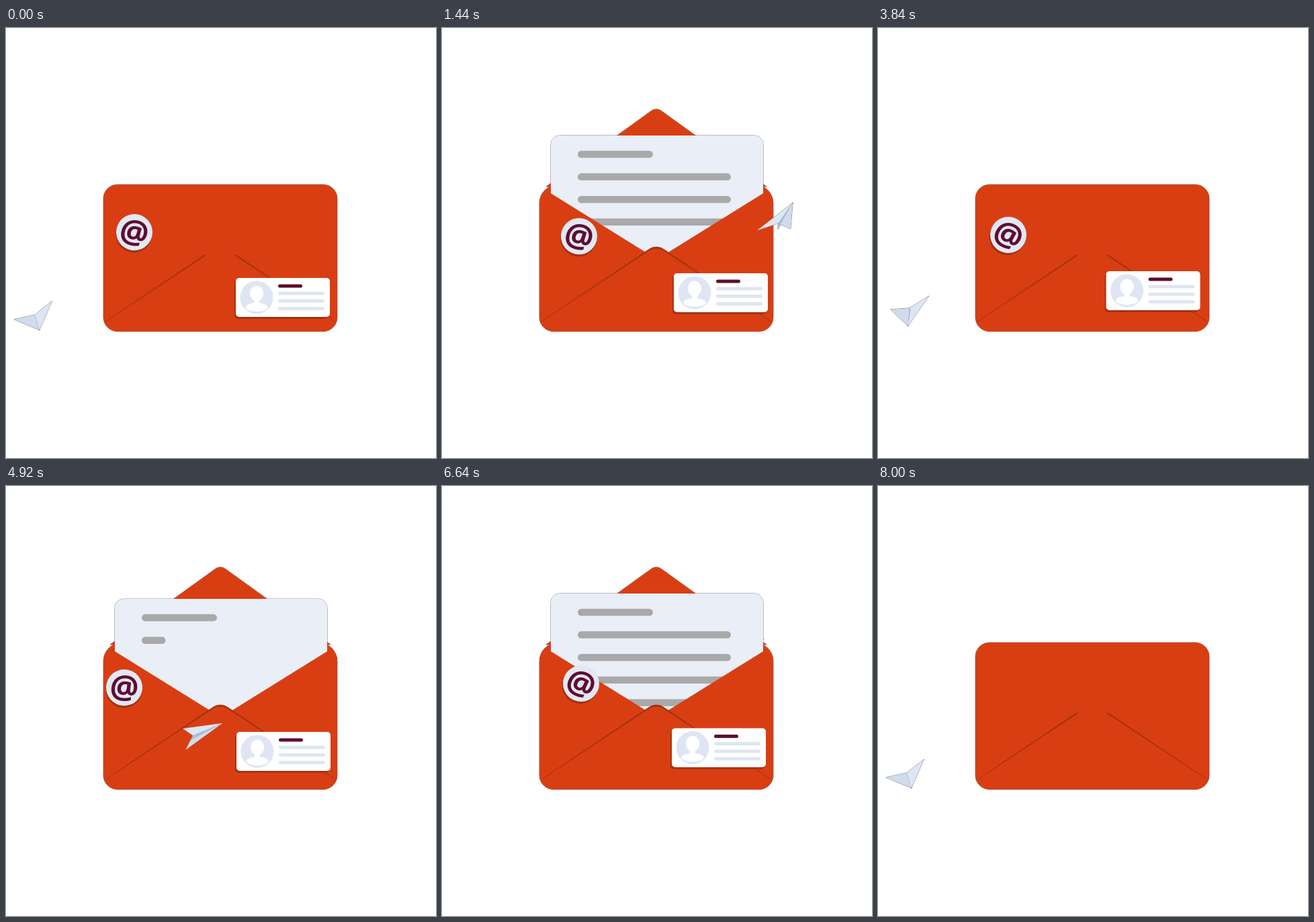
Animation of 640 by 640 pixels, one loop 8.04 s. Source, as an HTML page with a canvas:

```html
<!DOCTYPE html>
<html lang="en">
<head>
<meta charset="utf-8">
<title>Newsletter envelope</title>
<style>
  html, body { margin: 0; width: 100%; height: 100%; overflow: hidden; background: #fff; }
  canvas { display: block; width: 640px; height: 640px; }
</style>
</head>
<body>
<canvas id="stage" width="640" height="640"></canvas>
<script>
const ctx = document.getElementById('stage').getContext('2d');
const LOOP = 8040, CYCLE = 4000, STEP = 40, TURN = Math.PI * 2;
const RED = '#d93e13', SHADE = '#a5330f', PLUM = '#5f0d2f', PALE = '#dfe5f3', PAPER = '#e9eef7';

// Badge and card drift smoothly through a few places, one per beat.
const beats = [0, 1440, 2480, 3840, 4920, 6640];
const badgePlaces = [[191, 304, 12], [204, 310, 14], [198, 306, 8], [194, 308, 26], [176, 300, 4], [207, 294, 23]];
const cardPlaces = [[412, 401], [415, 394], [419, 391], [409.5, 391], [413, 395], [412, 389.5]];

function drift(places, t) {
  const n = beats.length;
  const time = i => beats[(i + n) % n] + Math.floor(i / n) * LOOP;
  const place = i => places[(i + n) % n];
  let i = n - 1;
  while (beats[i] > t) i--;
  const h = time(i + 1) - time(i), u = (t - time(i)) / h;
  const slope = (j, k) => h * (place(j + 1)[k] - place(j - 1)[k]) / (time(j + 1) - time(j - 1));
  return place(i).map((p, k) => {
    const q = place(i + 1)[k], m = slope(i, k), v = slope(i + 1, k);
    return p + u * (m + u * (3 * (q - p) - 2 * m - v + u * (2 * (p - q) + m + v)));
  });
}

const progress = (t, start, end) => Math.min(1, Math.max(0, (t - start) / (end - start)));
const smooth = u => (1 - Math.cos(Math.PI * u)) / 2;

function poly(...pts) {
  const p = new Path2D();
  pts.forEach(([x, y]) => p.lineTo(x, y));
  p.closePath();
  return p;
}
function rounded(x, y, w, h, r) {
  const p = new Path2D();
  p.roundRect(x, y, w, h, r);
  return p;
}
function oval(x, y, rx, ry = rx) {
  const p = new Path2D();
  p.ellipse(x, y, rx, ry, 0, 0, TURN);
  return p;
}
function peak(x1, x2, base, tip, r) {
  const p = new Path2D();
  p.moveTo(x1, base);
  p.arcTo((x1 + x2) / 2, tip, x2, base, r);
  p.lineTo(x2, base);
  p.closePath();
  return p;
}
function fill(path, color) {
  ctx.fillStyle = color;
  ctx.fill(path);
}
function bar(x1, x2, y, w, color) {
  if (x2 - x1 >= w) fill(rounded(x1, y - w / 2, x2 - x1, w, w / 2), color);
}
// Fine dark rim, seen only against the white page.
function rim(path) {
  ctx.strokeStyle = 'rgba(20,10,10,.55)';
  ctx.lineWidth = 1;
  ctx.stroke(path);
}

const bodyPath = topRadius => rounded(145, 233, 348, 218.5, [topRadius, topRadius, 21, 21]);
const closedBody = bodyPath(21), openBody = bodyPath(28);
const pocket = poly([145, 235.5], [320, 344.2], [495, 235.5], [495, 452], [145, 452]);
const foldShade = peak(147, 491, 437, 321.5, 20);
const fold = peak(147, 491, 438, 324.5, 20);

function flapScale(p) {
  if (p < CYCLE / 2) return 2 * smooth(progress(p, 100, 520)) - 1;
  return 1 - 2 * progress(p, 3320, 3820) ** 1.45;
}
function flapPath(scale) {
  const path = new Path2D();
  path.addPath(peak(155, 483, 0, -118, 12), new DOMMatrix([1, 0, 0, scale, 0, 236]));
  return path;
}
function letterTop(p) {
  const up = p < CYCLE / 2 ? smooth(progress(p, 500, 985)) : 1 - smooth(progress(p, 2840, 3320));
  return 345 - 185 * up;
}

function drawLetter(p, top) {
  ctx.save();
  ctx.beginPath();
  ctx.rect(0, 0, 640, 440);
  ctx.clip();
  fill(rounded(162, top, 316, 300, 13), PAPER);
  let typed = (p - 802) * 1.25;
  for (let i = 0; i < 5; i++) {
    const length = i ? 228 : 112;
    bar(202, 202 + Math.min(length, typed), top + 28 + i * 33.6, 10.5, '#a9a9a9');
    typed -= length;
  }
  ctx.restore();
}

function drawFront(body) {
  ctx.save();
  ctx.clip(body);
  fill(pocket, RED);
  fill(foldShade, SHADE);
  fill(fold, RED);
  ctx.restore();
}

function drawBadge([x, y, deg]) {
  ctx.save();
  ctx.translate(x, y);
  ctx.rotate(deg * TURN / 360);
  fill(oval(0, 3.5, 27), SHADE);
  fill(oval(0, 0, 27), '#e2e8f4');
  ctx.font = 'bold 48px "Open Sans", "Noto Sans", sans-serif';
  ctx.fillStyle = PLUM;
  const m = ctx.measureText('@');
  ctx.fillText('@',
    (m.actualBoundingBoxLeft - m.actualBoundingBoxRight) / 2,
    (m.actualBoundingBoxAscent - m.actualBoundingBoxDescent) / 2);
  ctx.restore();
}

function drawCard([x, y]) {
  ctx.save();
  ctx.translate(x, y);
  fill(rounded(-72, -26, 140, 58, 5), SHADE);
  fill(rounded(-70, -29, 140, 58, 5), '#fff');
  fill(oval(-39, 0, 24.5), PALE);
  fill(oval(-39, -6, 10.2, 11.5), '#fff');
  fill(rounded(-43, 3, 8, 10, 2), '#fff');
  fill(oval(-39, 14.5, 16.5, 6.5), '#fff');
  bar(-7, 29, -17, 5, PLUM);
  for (let i = 0; i < 3; i++) bar(-7, 62, -6 + i * 11.2, 5, PALE);
  ctx.restore();
}

// A flat dart turning in a tilted plane while it flies a slanted loop.
function planeAt(p) {
  const a = p / CYCLE * TURN;
  const x = 309 - 272 * Math.cos(a) + 20 * Math.sin(a) - 3 * Math.cos(2 * a) + 11 * Math.cos(3 * a);
  const y = 330 + 105 * Math.cos(a) + 22 * Math.sin(a);
  const heading = 1.29 - a + 0.227 * Math.cos(a - 0.63);
  const cos = Math.cos(heading), sin = Math.sin(heading);
  const at = (ahead, side, dx = 0, dy = 0) => {
    const u = ahead * cos - side * sin, v = ahead * sin + side * cos;
    return [x + 57 * u + 4 * v + dx, y - 24 * u + 32 * v + dy];
  };
  const nose = at(0.5, 0), notch = at(-0.27, 0), keel = at(-0.36, 0, 2, 5);
  const port = at(-0.5, -0.5), star = at(-0.5, 0.5);
  return {
    left: poly(nose, port, notch),
    right: poly(nose, star, notch),
    keel: poly(nose, notch, keel)
  };
}
function drawPlane({ left, right, keel }) {
  fill(right, '#d0dced');
  fill(left, '#dde6f3');
  fill(keel, '#a8bddb');
}

function draw(t) {
  const p = t % CYCLE;
  const scale = flapScale(p), top = letterTop(p), open = scale > 0;
  const body = open ? openBody : closedBody;
  const flap = flapPath(scale), plane = planeAt(p);
  const behind = p > 2200 && p < 3900;

  ctx.clearRect(0, 0, 640, 640);
  rim(body);
  if (open) rim(flap);
  if (top < 240) rim(rounded(162, top, 316, 440 - top, 13));
  Object.values(plane).forEach(rim);

  if (behind) drawPlane(plane);
  fill(body, RED);
  if (open) fill(flap, RED);
  drawLetter(p, top);
  drawFront(body);
  if (!open) fill(flap, RED);
  if (t < 2 * CYCLE) {
    drawBadge(drift(badgePlaces, t));
    drawCard(drift(cardPlaces, t));
  }
  if (!behind) drawPlane(plane);
}

const start = performance.now();
function frame() {
  const t = Math.max(0, performance.now() - start) % LOOP;
  draw(Math.floor(t / STEP) * STEP);
  requestAnimationFrame(frame);
}
frame();
</script>
</body>
</html>
```
